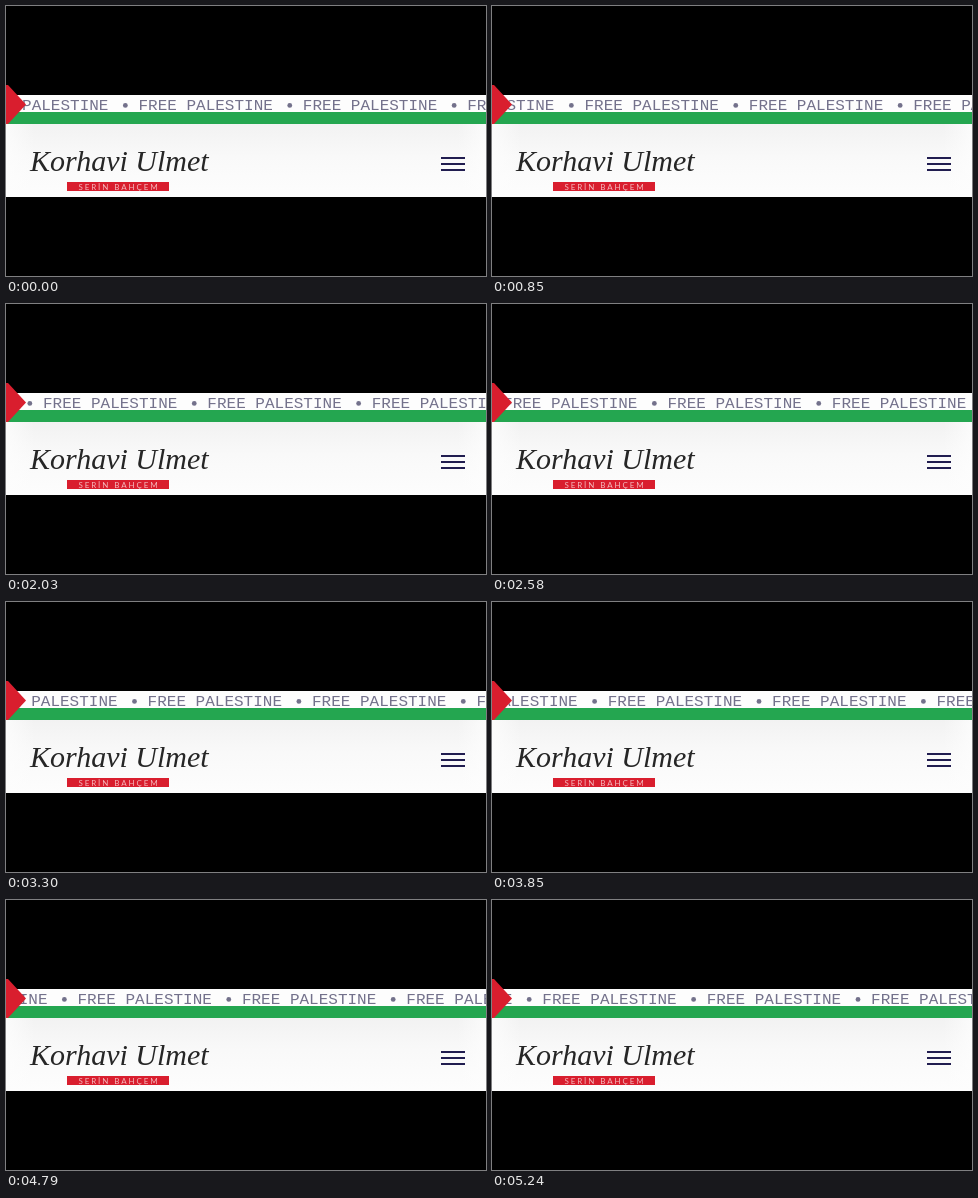
An HTML page that plays this animation: 480 by 270 pixels, repeating every 5270 ms.

```html
<!DOCTYPE html>
<html lang="tr">
<head>
<meta charset="utf-8">
<title>Site header with ticker</title>
<style>
  html, body { margin: 0; width: 100%; height: 100%; overflow: hidden; background: #000; }
  svg { display: block; width: 100vw; height: 100vh; }
  .ticker { font: 16px "Courier New", "Liberation Mono", monospace; fill: #73718b; white-space: pre; }
  .name { font: italic 30px "Liberation Serif", "Times New Roman", serif; fill: #262626; }
  .tagline { font: 8px Lato, "Open Sans", sans-serif; letter-spacing: 1.9px; fill: #f3b9bd; }
</style>
</head>
<body>
<svg viewBox="0 0 480 270" xmlns="http://www.w3.org/2000/svg">
  <defs>
    <linearGradient id="shade" x2="0" y2="1">
      <stop offset="0" stop-color="#f2f2f2"/>
      <stop offset=".45" stop-color="#f9f9f9"/>
      <stop offset="1" stop-color="#fdfdfd"/>
    </linearGradient>
    <linearGradient id="sides">
      <stop offset="0" stop-color="#fdfdfd" stop-opacity=".8"/>
      <stop offset=".06" stop-color="#fdfdfd" stop-opacity="0"/>
      <stop offset=".94" stop-color="#fdfdfd" stop-opacity="0"/>
      <stop offset="1" stop-color="#fdfdfd" stop-opacity=".8"/>
    </linearGradient>
    <clipPath id="strip"><rect y="89" width="480" height="17"/></clipPath>
  </defs>

  <rect width="480" height="270"/>
  <rect y="89" width="480" height="17" fill="#fdfdfd"/>
  <g clip-path="url(#strip)"><g id="ticker" class="ticker"></g></g>
  <rect y="106" width="480" height="12" fill="#24a650"/>
  <path d="M0 79H2L20 98.5L2 118H0Z" fill="#d91e2e"/>

  <rect y="118" width="480" height="73" fill="url(#shade)"/>
  <rect y="118" width="480" height="73" fill="url(#sides)"/>
  <text class="name" x="24" y="165">Korhavi Ulmet</text>
  <rect x="61" y="176" width="102" height="9" fill="#d91e2e"/>
  <text class="tagline" x="113" y="183.5" text-anchor="middle">SERİN BAHÇEM</text>
  <path d="M435 152H459M435 158H459M435 164H459" stroke="#211d50" stroke-width="2"/>
</svg>
<script>
  const LOOP = 5270;      // ms
  const SPEED = 0.04705;  // px per ms
  const PERIOD = 164.4;   // px between two phrases
  const START = 132.5;
  const ticker = document.getElementById('ticker');

  // Each phrase is followed by its separating dot.
  const phrase = x => `<g transform="translate(${x} 0)">
    <text transform="translate(0 103.6) scale(1 .9)">FREE PALESTINE</text>
    <circle cx="151.3" cy="99.4" r="2.4"/></g>`;
  ticker.innerHTML = [-1, 0, 1, 2, 3, 4].map(i => phrase(i * PERIOD)).join('');

  function draw(time) {
    const x = START - SPEED * (time % LOOP);
    ticker.setAttribute('transform', `translate(${x.toFixed(2)} 0)`);
  }

  const begin = performance.now();
  function tick() {
    draw(performance.now() - begin);
    requestAnimationFrame(tick);
  }
  draw(0);
  requestAnimationFrame(tick);
</script>
</body>
</html>
```
